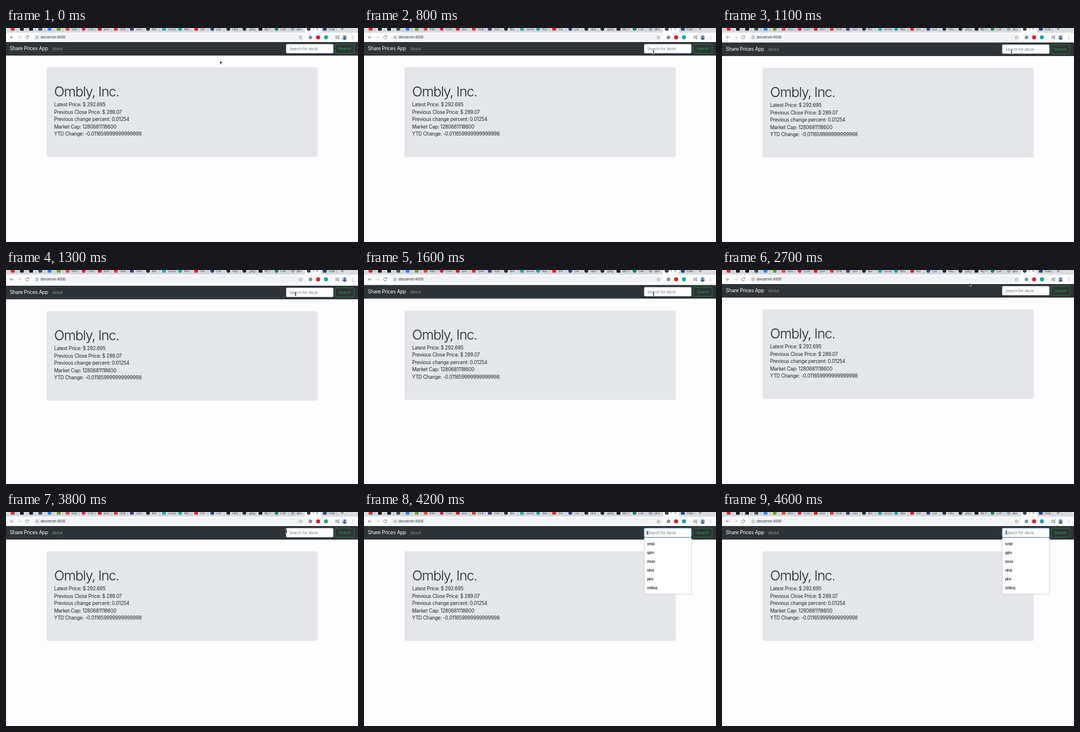
Animation of 600 by 366 pixels, one loop 5 s. Source, as an HTML page:

```html
<!DOCTYPE html>
<html lang="en">
<head>
<meta charset="utf-8">
<title>Share prices</title>
<style>
  html, body { margin: 0; width: 100%; height: 100%; overflow: hidden; background: #fdfdfd; }
  svg { display: block; width: 100vw; height: 100vh; }
  text { font-family: Inter, Roboto, sans-serif; letter-spacing: -.022em; white-space: pre; }
  .lead { font-size: 8.33px; fill: #212529; }
  .title { font-size: 23.33px; font-weight: 300; letter-spacing: -.045em; fill: #212529; }
  .control { font-size: 6.67px; }
  .option { font-size: 5.6px; font-weight: 500; fill: #111; }
  .tab { font-size: 5.2px; fill: #45494d; }
  .line { fill: none; stroke: #5f6368; stroke-width: .8; }
</style>
</head>
<body>
<svg viewBox="0 0 600 366">
  <rect width="600" height="366" fill="#fdfdfd"/>

  <g id="page">
    <rect y="24" width="600" height="23.2" fill="#2d3337"/>
    <text class="lead" x="6.5" y="38.3" style="fill:#fff">Share Prices App</text>
    <text class="control" x="78.8" y="38" fill="#96999b">About</text>
    <rect id="ring" x="476.7" y="26.7" width="82.2" height="17.4" rx="2.4" fill="#22496f"/>
    <rect id="field" x="477.7" y="27.7" width="80.2" height="15.4" rx="1.6" fill="#fff" stroke="#ced4da" stroke-width=".5"/>
    <text class="control" x="483" y="38" fill="#6c757d" style="letter-spacing:-.03em">Search for stock</text>
    <rect x="561.3" y="27.8" width="32" height="15.4" rx="1.7" fill="none" stroke="#28a745" stroke-width=".6"/>
    <text class="control" x="566.7" y="38" fill="#28a745">Search</text>

    <rect x="69" y="67.3" width="462.3" height="153.3" rx="2" fill="#e4e6ea"/>
    <text class="title" x="82" y="117">Ombly, Inc.</text>
    <g id="facts"></g>
  </g>

  <g id="options">
    <rect x="477" y="44" width="82" height="97.3" rx="1" fill="#000" opacity=".12"/>
    <rect x="477.6" y="43.9" width="80.8" height="96.4" rx=".8" fill="#fff" stroke="#c4c6c9" stroke-width=".5"/>
  </g>

  <!-- browser frame -->
  <rect width="600" height="8.3" fill="#d9dce1"/>
  <g id="tabs"></g>
  <rect y="8" width="600" height="15.8" fill="#fff"/>
  <rect x="45.5" y="10" width="464" height="11.8" rx="5.9" fill="#f1f3f4"/>
  <path class="line" d="M13 16H7.5M10 13.4L7.4 16L10 18.6"/>
  <path class="line" d="M20.5 16H26M23.5 13.4L26.1 16L23.5 18.6" style="stroke:#b9bcc0"/>
  <path class="line" d="M38.2 14.4A2.6 2.6 0 1 0 38.7 16.6M38.6 13V15H36.6"/>
  <circle class="line" cx="53" cy="16" r="2.3" style="stroke-width:.6"/>
  <path class="line" d="M53 15.7V17.3M53 14.5V15.1" style="stroke-width:.6"/>
  <text x="59" y="18" font-size="5.83" fill="#303438">devserver:4000</text>
  <path class="line" d="M502 13.2l.8 1.9 2 .2-1.5 1.3.5 2-1.8-1.1-1.8 1.1.5-2-1.5-1.3 2-.2z" style="stroke-width:.5"/>
  <circle cx="519" cy="16" r="3.1" fill="#8b8f94"/>
  <circle cx="532" cy="16" r="3.5" fill="#d8202f"/>
  <circle cx="545.4" cy="16" r="3.4" fill="#16a79c"/>
  <path d="M554 12.3V19.7" stroke="#d5d8dc" stroke-width=".5"/>
  <path class="line" d="M561.3 14H566M561.3 16H566M561.3 18H564M567 17.8V13.5H568.6"/>
  <circle cx="566.2" cy="18" r="1.1" fill="#5f6368"/>
  <circle cx="577.2" cy="16" r="4.1" fill="#a9c3d3"/>
  <path d="M574 18.6Q574.5 16.6 577.2 16.6T580.4 18.6A4.1 4.1 0 0 1 574 18.6" fill="#3f6075"/>
  <circle cx="577.2" cy="14.8" r="1.5" fill="#3f6075"/>
  <g fill="#5f6368"><circle cx="591" cy="13.8" r=".6"/><circle cx="591" cy="16" r=".6"/><circle cx="591" cy="18.2" r=".6"/></g>

  <path id="arrow" d="M0 0V5.6L1.3 4.5L2.2 6.5L3.1 6.1L2.2 4.1H3.9Z" fill="#000" stroke="#fff" stroke-width=".5"/>
  <g id="beam" fill="none" stroke-linecap="round">
    <path d="M-1.2 -2.9Q0 -2.9 0 -2V2Q0 2.9 -1.2 2.9M1.2 -2.9Q0 -2.9 0 -2V2Q0 2.9 1.2 2.9M-.6 .8H.6" stroke="#fff" stroke-width="1.5"/>
    <path d="M-1.2 -2.9Q0 -2.9 0 -2V2Q0 2.9 -1.2 2.9M1.2 -2.9Q0 -2.9 0 -2V2Q0 2.9 1.2 2.9M-.6 .8H.6" stroke="#111" stroke-width=".7"/>
  </g>
</svg>
<script>
const LOOP = 5000, STEP = 100;
const el = id => document.getElementById(id);

function add(parent, tag, attrs, content = '') {
  const node = document.createElementNS('http://www.w3.org/2000/svg', tag);
  for (const key in attrs) node.setAttribute(key, attrs[key]);
  node.textContent = content;
  parent.append(node);
}

['Latest Price: $ 292.695', 'Previous Close Price: $ 289.07', 'Previous change percent: 0.01254',
 'Market Cap: 1280681118600', 'YTD Change: -0.011659999999999998'].forEach((line, i) =>
  add(el('facts'), 'text', { class: 'lead', x: 82, y: 134.3 + i * 12.5 }, line));

['ombl', 'qdrn', 'mexo', 'nilok', 'plim', 'zelduq'].forEach((word, i) =>
  add(el('options'), 'text', { class: 'option', x: 482.5, y: 56.9 + i * 15 }, word));

// Six pinned tabs, then titled ones: [colour, title, round icon]
const pinned = ['#e3202b', '#17191b', '#17191b', '#3d4f60', '#2f80ed', '#6f9a2c'];
const titled = [
  ['#d94a3d', 'Inbo'], ['#d6205a', 'Com', 1], ['#c8222c', 'json'], ['#d9383a', 'Onlii'],
  ['#4b3a78', 'Jum'], ['#24292e', 'libs', 1], ['#2ba6a6', 'verse'], ['#18a79a', 'Abo', 1],
  ['#e3202b', 'Vid'], ['#26457a', 'List', 1], ['#24292e', 'niloj', 1], ['#24292e', '.gitig', 1],
  ['#17191b', 'My f'], ['#16864b', 'Lett', 1], ['#9aa6b5', 'abo', 1], ['#3c4043', '1', 1], ['#28407a', 'Vide']
];
const tabs = el('tabs');
function icon(x, fill, round) {
  if (round) add(tabs, 'circle', { cx: x, cy: 1.5, r: 3.2, fill });
  else add(tabs, 'rect', { x: x - 3.2, y: -1.5, width: 6.4, height: 6, rx: .7, fill });
}
function divider(x) { add(tabs, 'path', { d: `M${x} 0V5.5`, stroke: '#92969b', 'stroke-width': .5 }); }

pinned.forEach((fill, i) => { icon(11.4 + i * 15.7, fill); divider(19 + i * 15.65); });
titled.forEach(([fill, title, round], i) => {
  const x = 105 + i * 27.4, active = title === '1';
  if (active) add(tabs, 'path', { d: 'M507 8.3Q510 8 510 5V0H536.5V5Q536.5 8 539.5 8.3Z', fill: '#fff' });
  icon(x, fill, round);
  add(tabs, 'text', { class: 'tab', x: x + 6.7, y: 3.6 }, title);
  if (active) add(tabs, 'path', { class: 'line', d: 'M529 .2L532 3.2M532 .2L529 3.2' });
  else if (i !== 14) divider(x + 20);
});
add(tabs, 'path', { class: 'line', d: 'M570.7 1.5H575.7M573.2 -1V4' });

// [time, x, y] for the pointer and [time, offset] for the overscroll
const pointerKeys = [[0, 365, 56], [600, 492.5, 41], [700, 493, 41], [800, 493.5, 41],
  [2000, 493.5, 41], [2200, 494.5, 40.5], [2300, 494.5, 40.5], [2700, 422, 22],
  [3300, 422, 22], [3800, 478, 33], [4000, 483, 35.5], [4300, 483, 35.5], [4600, 484.5, 35]];
const scrollKeys = [[1000, 0], [1300, 2.9], [1400, 2.9], [1600, 1.7], [1800, 0]];

function sample(keys, time) {
  const next = keys.findIndex(key => key[0] > time);
  if (next < 0) return keys[keys.length - 1].slice(1);
  if (next === 0) return keys[0].slice(1);
  const a = keys[next - 1], b = keys[next];
  const p = (time - a[0]) / (b[0] - a[0]), eased = p * p * (3 - 2 * p);
  return a.slice(1).map((v, i) => v + (b[i + 1] - v) * eased);
}

const show = (id, on) => el(id).style.display = on ? '' : 'none';

function draw(now) {
  const time = Math.floor(now % LOOP / STEP) * STEP;
  const [x, y] = sample(pointerKeys, time);
  const [offset] = sample(scrollKeys, time);
  const overField = x > 477 && x < 558 && y > 28 && y < 43.5;
  const focused = time >= 4000;

  el('page').setAttribute('transform', `translate(0 ${offset})`);
  for (const id of ['arrow', 'beam']) el(id).setAttribute('transform', `translate(${x} ${y})`);
  show('arrow', !overField);
  show('beam', overField);
  show('ring', focused);
  el('field').setAttribute('stroke', focused ? '#80bdff' : '#ced4da');
  show('options', time >= 4100);
  requestAnimationFrame(draw);
}
draw(0);
</script>
</body>
</html>
```
